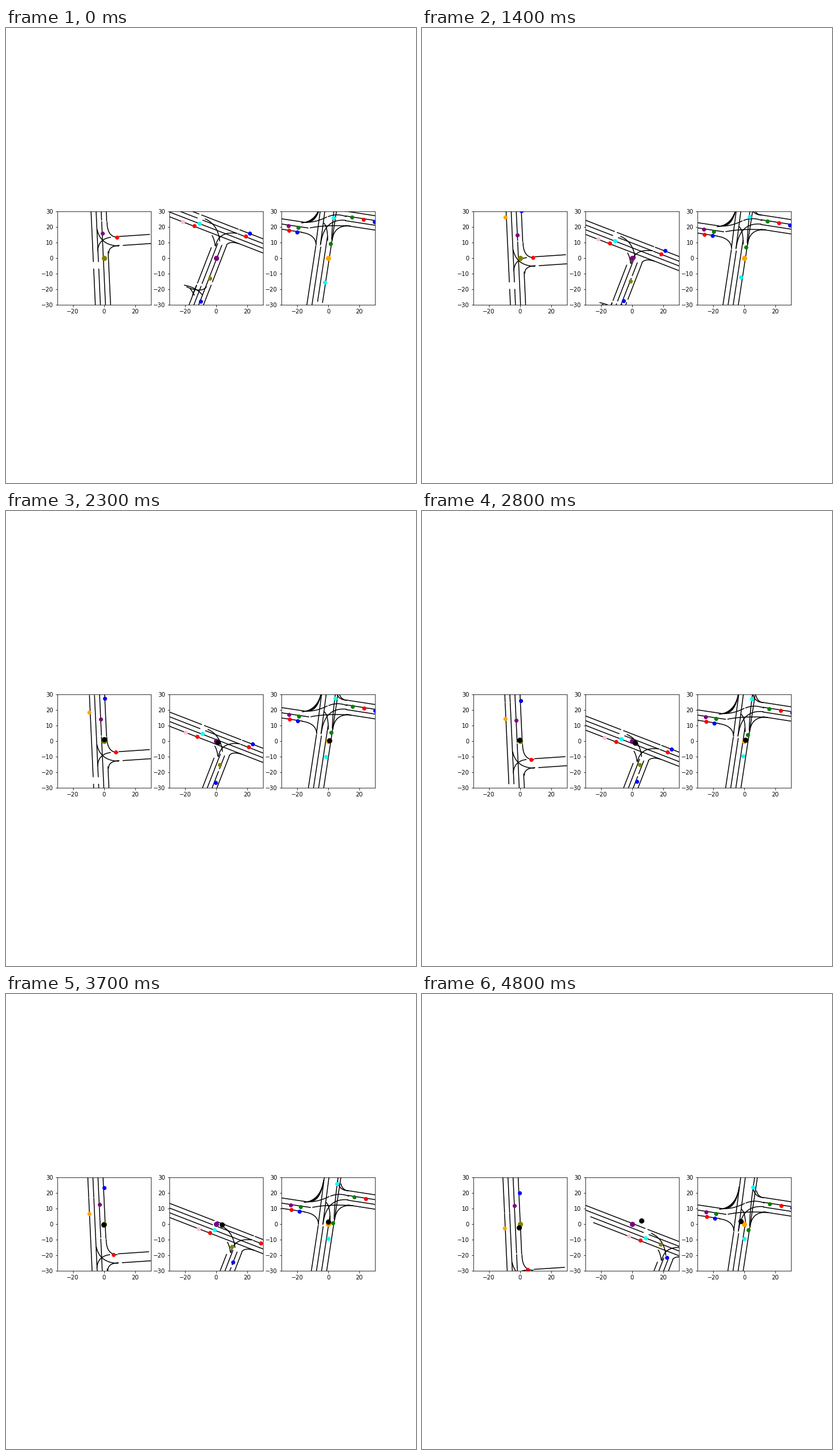
Write a matplotlib script that moves like this. It is 710 px wide and 789 px high and loops after 4.9 s.

```python
import numpy as np
import matplotlib.pyplot as plt
from matplotlib.animation import FuncAnimation

W, H, DPI, FRAMES = 710, 789, 72, 49
SIDE = 0.775 * W / 3.4          # side of one square panel in pixels
UNIT = SIDE / 60                # pixels per data unit
MID_Y = 399                     # vertical centre of the panels
KEYS = np.array([0, 7, 14, 19, 28, 37, 48])
FORECAST = 19                   # first step with a black marker


def hermite(t, vals):
    """Smooth curve through values at the key steps."""
    vals = np.array(vals, float)
    slope = np.gradient(vals, KEYS.astype(float))
    i = min(np.searchsorted(KEYS, t, side="right") - 1, len(KEYS) - 2)
    d = KEYS[i + 1] - KEYS[i]
    u = (t - KEYS[i]) / d
    ease = u * u * (3 - 2 * u)
    return (vals[i] + ease * (vals[i + 1] - vals[i])
            + d * u * (1 - u) * ((1 - u) * slope[i] - u * slope[i + 1]))


def glide(t, pos, vel=(0, 0), acc=(0, 0)):
    return [p + v * t + a * t * t for p, v, a in zip(pos, vel, acc)]


def bend(a, corner, b):
    """Rounded turn from a to b."""
    t = np.linspace(0, 1, 24)[:, None]
    a, corner, b = map(np.array, (a, corner, b))
    return (1 - t) ** 2 * a + 2 * t * (1 - t) * corner + t ** 2 * b


def road(base, gap, slope, ref, *lanes, upright=True):
    """Parallel lanes, each drawn between pairs of stops."""
    parts = []
    for k, stops in enumerate(lanes):
        for u in np.reshape(stops, (-1, 2)):
            v = base + k * gap + slope * (u - ref)
            parts.append(np.column_stack([v, u] if upright else [u, v]))
    return parts


# Positions are stage pixels; each map slides under a fixed centre.
# Cars are (colour, position, velocity, acceleration) per step.
outer = (180, 263, 265, 405, 418, 490)
left = dict(
    ego="olive",
    shift=([0, 0.1, 0, 0, -0.8, -1.5, -1.8], [0, 18, 35.2, 46.3, 68, 89, 116]),
    lines=road(154.7, 8.8, 0.046, 480, outer, outer,
               (180, 333, 336, 490), (180, 335, 388, 490))
    + road(361.5, 15.9, -0.067, 196, (196, 248.5), (203, 262), upright=False)
    + [
        bend((175, 337), (175.5, 363), (194, 363)),
        bend((178, 390), (178, 378), (196, 377)),
        bend((159, 386), (160, 366), (181, 363)),
        bend((158, 350), (164, 377), (195, 378)),
    ],
    on_map=[("red", (192.5, 362.5), (0, 0), (-0.0033, 0))],
    on_stage=[
        ("purple", (167.5, 355.7), (-0.147, 0.243)),
        ("orange", (145, 296), (-0.04, 2.29)),
        ("blue", (173.5, 305.5), (-0.1, 0.83)),
    ],
    black=((170, 396), (-0.06, 0.05), (0, 0.0095)),
)

middle = dict(
    ego="purple",
    shift=([0, -1.6, -0.9, 1.7, 10.2, 26.5, 52.2], [0, 15.6, 30.3, 40.2, 56.6, 70.5, 84]),
    lines=road(365.5, 8.2, 0.388, 445,
               (215, 334, 339, 402, 405, 470), (215, 331, 341, 399, 402, 470),
               (240, 470), (245, 470), upright=False)
    + road(317, 8.35, -0.388, 480,
           (381, 442, 447, 490), (374, 443, 448, 490),
           (377, 399, 404, 490), (377, 440, 446, 490))
    + [
        bend((345, 331), (367, 341), (370, 369)),
        bend((363, 378), (368, 352), (400, 356)),
        bend((382, 376), (388, 369), (403, 374)),
        bend((357, 360), (361, 367), (362, 377)),
        bend((309, 446), (330, 450), (340, 463)),
        bend((313, 449), (338, 460), (347, 449)),
        bend((323, 463), (326, 455), (330, 446)),
        bend((319, 452), (323, 457), (326, 463)),
    ],
    on_map=[
        ("pink", (306, 336)), ("red", (326.2, 343)), ("cyan", (334.8, 338.7)),
        ("blue", (421.9, 356)), ("red", (414.8, 361.2)), ("green", (448.6, 367.2)),
    ],
    on_stage=[
        ("olive", (352.5, 434), (0.35, 0.52), (0.0188, -0.011)),
        ("blue", (337, 473.5), (0.5, 0.1), (0.0272, -0.0092)),
        ("orange", (447.5, 381.5), (1, 2)),
    ],
    black=((364.5, 399.3), (0.55, 0.49), (0, -0.0238)),
)

right = dict(
    ego="orange",
    shift=([0, -2, -0.8, 0, 2.6, 4.2, 3.3], [0, 0, 6.6, 7.8, 14.4, 23.4, 35.3]),
    lines=road(521, 8.85, -0.152, 480,
               (378, 490), (380, 490), (362, 474), (270, 476))
    + road(537, 8, -0.13, 372, (265, 374), (265, 376))
    + road(331, 9, 0.15, 478, (465, 515), (465, 523), (465, 512), upright=False)
    + road(325.5, 8.3, 0.155, 639, *[(588, 650)] * 4, upright=False)
    + [bend((512 + 6 * k, 338 - k), (540, 335), (546, 300)) for k in range(3)]
    + [
        bend((512, 354.5), (536, 358), (537, 376)),
        bend((564, 366), (565, 330), (574, 275)),
        bend((515, 337), (535, 338), (555, 328)),
        bend((558, 327), (573, 321), (589, 327)),
        bend((527, 346.5), (555, 341), (596, 343.5)),
        bend((545, 374), (551, 330), (588, 333.5)),
        bend((565, 368), (568, 341), (596, 343.5)),
        bend((550, 338), (557, 344), (557, 368)),
        bend((570, 300), (572, 317), (588, 317.7)),
        bend((576, 306), (578, 316), (588, 318)),
    ],
    on_map=[
        ("purple", (488.8, 342.5)), ("red", (489.5, 351)), ("blue", (503.7, 353.5)),
        ("green", (506, 346)), ("green", (598.5, 328.3)), ("red", (618.7, 331.5)),
        ("blue", (638, 335.5)), ("green", (561.5, 373.5)),
        ("cyan", (567.3, 329), (0.05, -0.62)),
        ("cyan", (551.5, 441), (0.07, -1.1)),
    ],
    on_stage=[],
    black=((558.7, 398.5), (0.37, -0.17), (-0.0213, 0)),
)


class Panel:
    def __init__(self, ax, scene, index):
        self.scene = scene
        self.mid_x = 0.125 * W + SIDE * (0.5 + 1.2 * index)
        ax.set(xlim=(-30, 30), ylim=(-30, 30), aspect="equal",
               xticks=[-20, 0, 20], yticks=range(-30, 31, 10))
        self.lines = [ax.plot([], [], color="black")[0] for _ in scene["lines"]]
        self.cars = {key: [self.dot(ax, car[0]) for car in scene[key]]
                     for key in ("on_map", "on_stage")}
        self.dot(ax, scene["ego"], 8).set_data([0], [0])
        self.black = self.dot(ax, "black", 8)

    @staticmethod
    def dot(ax, color, size=6):
        return ax.plot([], [], "o", color=color, ms=size)[0]

    def place(self, artist, x, y):
        artist.set_data(np.atleast_1d((x - self.mid_x) / UNIT),
                        np.atleast_1d((MID_Y - y) / UNIT))

    def draw(self, t):
        dx, dy = (hermite(t, v) for v in self.scene["shift"])
        for artist, p in zip(self.lines, self.scene["lines"]):
            self.place(artist, p[:, 0] + dx, p[:, 1] + dy)
        for key, (ox, oy) in dict(on_map=(dx, dy), on_stage=(0, 0)).items():
            for artist, (_, *path) in zip(self.cars[key], self.scene[key]):
                x, y = glide(t, *path)
                self.place(artist, x + ox, y + oy)
        self.place(self.black, *glide(t - FORECAST, *self.scene["black"]))
        self.black.set_visible(t >= FORECAST)


fig, axes = plt.subplots(1, 3, figsize=(W / DPI, H / DPI), dpi=DPI)
# Equal aspect centres the panels between these two edges.
fig.subplots_adjust(bottom=0.11, top=2 * (1 - MID_Y / H) - 0.11)
panels = [Panel(*args) for args in zip(axes, (left, middle, right), range(3))]


def update(t):
    for panel in panels:
        panel.draw(t)
    return []


anim = FuncAnimation(fig, update, frames=FRAMES, interval=100, repeat=True, repeat_delay=0)
plt.show()
```
